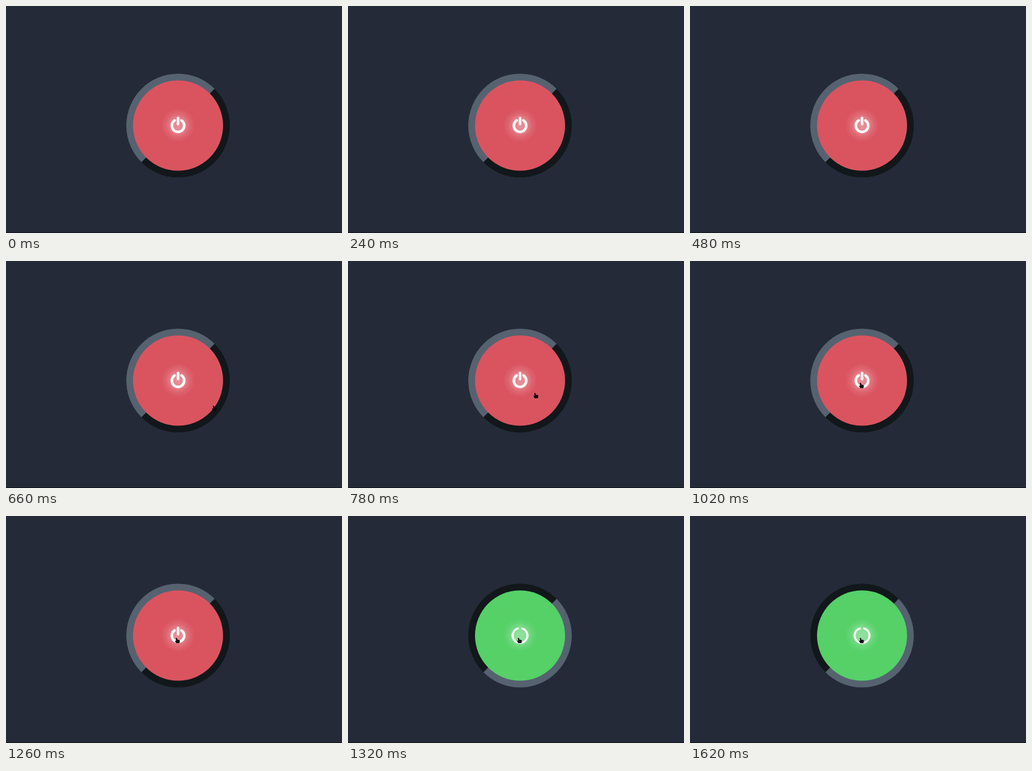
An HTML page for the animation above (1.8 s loop, 500 by 337 pixels).

```html
<!DOCTYPE html>
<html lang="en">
<head>
<meta charset="utf-8">
<title>Power button</title>
<style>
  html, body { margin: 0; width: 100%; height: 100%; overflow: hidden; background: #242a37; }
  svg { display: block; width: 500px; height: 337px; }
  #stage { --face: #da5460; --upper: #566270; --lower: #11171a; }
  #stage.on { --face: #55d168; --upper: #11171a; --lower: #566270; }
  .on .off-icon, #stage:not(.on) .on-icon { display: none; }
  .icon { fill: none; stroke: #fff; }
</style>
</head>
<body>
<svg id="stage" viewBox="0 0 500 337">
  <defs>
    <radialGradient id="glow">
      <stop offset="0" stop-color="#fff" stop-opacity=".36"/>
      <stop offset=".4" stop-color="#fff" stop-opacity=".29"/>
      <stop offset=".7" stop-color="#fff" stop-opacity=".1"/>
      <stop offset="1" stop-color="#fff" stop-opacity="0"/>
    </radialGradient>
  </defs>
  <rect width="500" height="337" fill="#242a37"/>
  <rect y="336" width="500" height="1" fill="#11151c"/>
  <g transform="translate(256 177.5)">
    <g transform="rotate(-45)" fill="none" stroke-width="11">
      <path d="M-71.5 0A71.5 71.5 0 0 1 71.5 0" style="stroke:var(--upper)"/>
      <path d="M71.5 0A71.5 71.5 0 0 1 -71.5 0" style="stroke:var(--lower)"/>
    </g>
    <circle r="67" style="fill:var(--face)"/>
    <circle cy="-.5" r="25" fill="url(#glow)"/>
    <g class="icon off-icon" stroke-width="3.8" stroke-linecap="round">
      <path d="M5 -7.6A9.2 9.2 0 1 1 -5 -7.6"/>
      <path d="M0 -11.3V-2.2"/>
    </g>
    <path class="icon on-icon" stroke-width="3" d="M2 -10.9A11 11 0 1 1 -2 -10.9"/>
  </g>
  <path id="hand" fill="#0c0c0f" visibility="hidden"
    d="M-1.8 -3.8Q-.9 -4.6 -.1 -3.8L.6 -1.4L3.2 -1Q4.2 -.6 4.2 .6L3.6 3.8H-1.2L-3 .6Q-2.6 -.4 -1.2 .2Z"/>
</svg>
<script>
  const LOOP = 1800, STEP = 60, ENTER = 600, REST = 1020, PRESS = 1320;
  const stage = document.getElementById('stage');
  const hand = document.getElementById('hand');
  const start = performance.now();

  function draw(now) {
    const t = Math.floor(Math.max(0, now - start) % LOOP / STEP) * STEP;
    // Pointer glides in and slows down over the icon.
    const left = 1 - Math.min(1, Math.max(0, (t - ENTER) / (REST - ENTER)));
    const x = 254.5 + 75 * left ** 2;
    const y = 185 + 46 * left ** 2;
    hand.setAttribute('transform', `translate(${x} ${y})`);
    hand.setAttribute('visibility', t >= ENTER ? 'visible' : 'hidden');
    stage.classList.toggle('on', t >= PRESS);
    requestAnimationFrame(draw);
  }
  draw(start);
</script>
</body>
</html>
```
